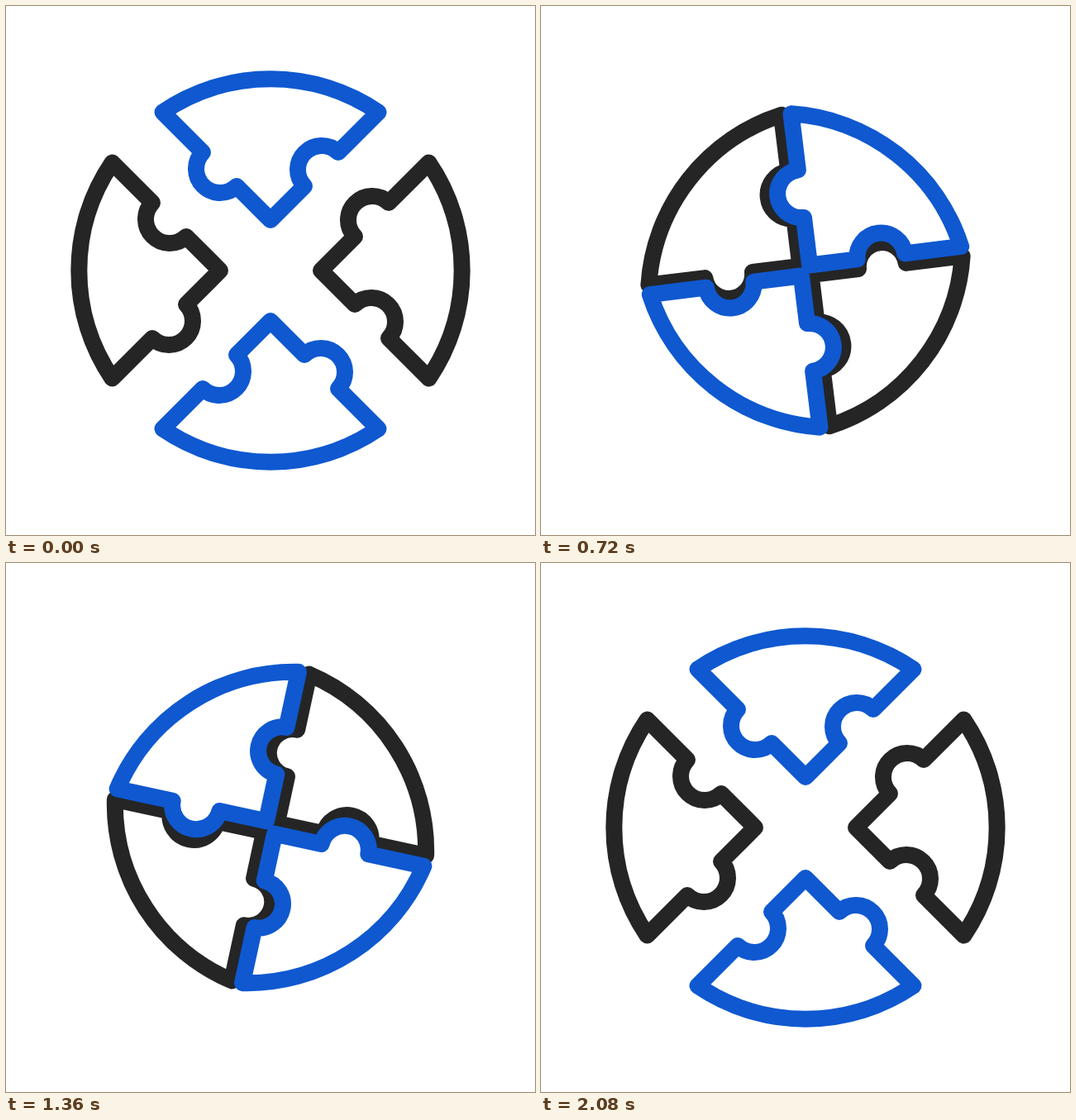
Write an HTML page that moves like this. It is 640 px wide and 640 px high and loops after 2.2 s.

```html
<!DOCTYPE html>
<html lang="en">
<head>
<meta charset="utf-8">
<title>Puzzle wheel</title>
<style>
  html, body { margin: 0; height: 100%; overflow: hidden; background: #fff; }
  svg { display: block; width: 100%; height: 100%; }
</style>
</head>
<body>
<svg viewBox="-320 -320 640 640" fill="none" stroke-width="20" stroke-linejoin="round">
  <defs>
    <!-- Quarter piece with its tip at the origin -->
    <path id="piece" d="M0 0L-41-41A29 29 0 0 1-82-82L-130.5-130.5A232 232 0 0 1 130.5-130.5L82-82A29 29 0 0 0 41-41Z"/>
  </defs>
  <g id="wheel">
    <g stroke="#252525">
      <use href="#piece" data-turn="90"/>
      <use href="#piece" data-turn="270"/>
    </g>
    <g stroke="#0f58d0">
      <use href="#piece" data-turn="0"/>
      <use href="#piece" data-turn="180"/>
    </g>
  </g>
</svg>
<script>
const LOOP = 2200, STEP = 40, SPREAD = 61;
const START = 40, CLOSED = 1040, END = 2000;
const wheel = document.getElementById('wheel');
const pieces = [...wheel.querySelectorAll('use')];

// Symmetric ease: cubic-bezier(a, 0, 1 - a, 1), solved by bisection
function ease(x, a) {
  let lo = 0, hi = 1;
  for (let i = 0; i < 30; i++) {
    const s = (lo + hi) / 2;
    const bx = s + (3 * a - 1) * s * (1 - s) * (1 - 2 * s);
    if (bx < x) lo = s; else hi = s;
  }
  return lo * lo * (3 - 2 * lo);
}

function progress(t, from, to, a) {
  const x = (t - from) / (to - from);
  return x <= 0 ? 0 : x >= 1 ? 1 : ease(x, a);
}

function draw(now) {
  // The motion runs at 25 pictures per second
  const t = Math.floor((now % LOOP + 2) / STEP) * STEP;
  const angle = 180 * progress(t, START, END, 0.533);
  const gap = SPREAD * (1 - progress(t, START, CLOSED, 0.645) + progress(t, CLOSED, END, 0.645));
  wheel.setAttribute('transform', `rotate(${angle})`);
  for (const p of pieces) {
    p.setAttribute('transform', `rotate(${p.dataset.turn}) translate(0 ${-gap})`);
  }
  requestAnimationFrame(draw);
}

draw(0);
</script>
</body>
</html>
```
